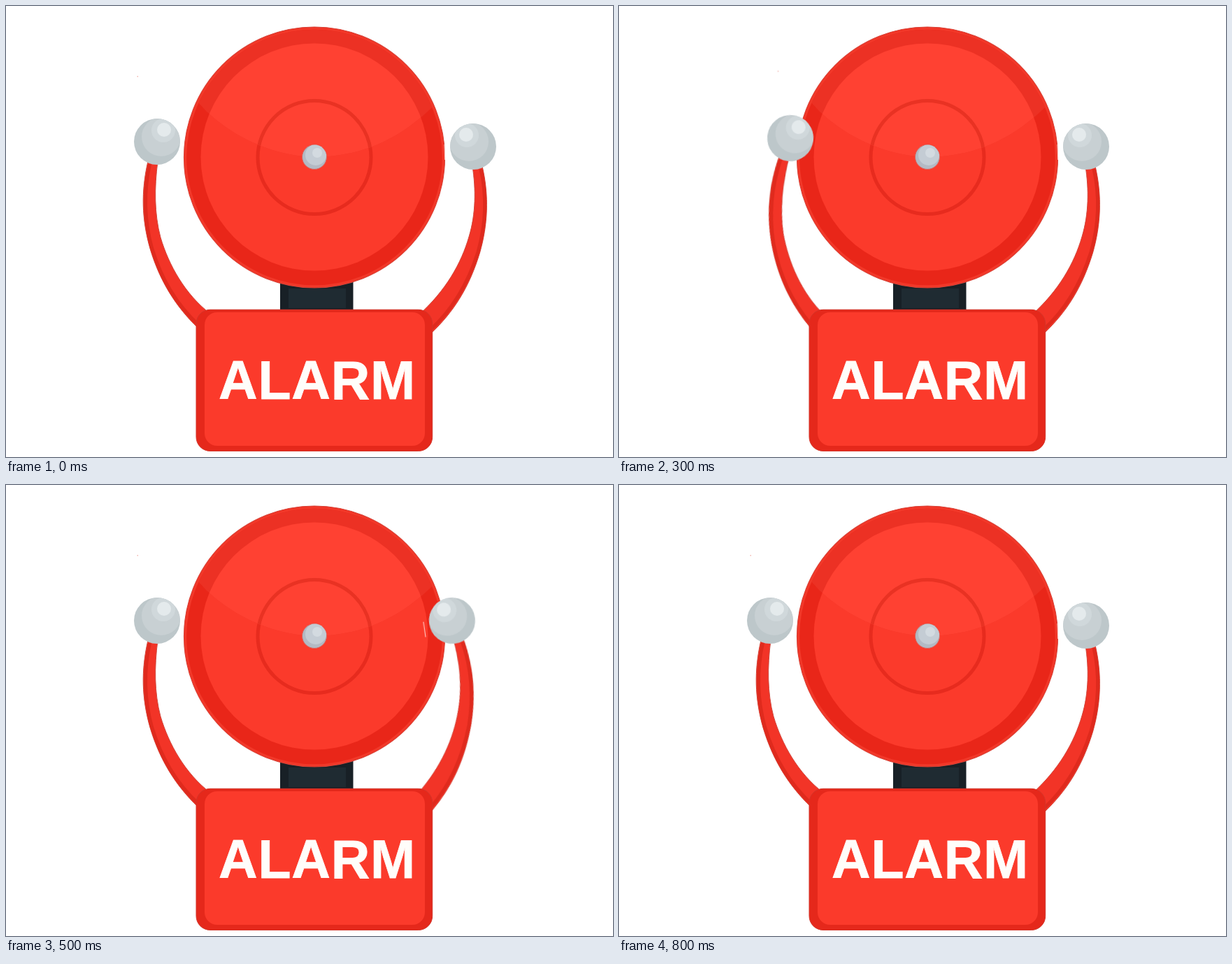
These frames come from a looping animation (868 by 645 pixels, 0.9 s). An HTML page:

```html
<!DOCTYPE html>
<html lang="en">
<head>
<meta charset="utf-8">
<title>Alarm bell</title>
<style>
  html, body { margin: 0; width: 100%; height: 100%; overflow: hidden; background: #fff; }
  svg { display: block; width: 100%; height: 100%; }

  .left, .right { animation: 900ms step-end infinite; }
  .left { transform-origin: 276px 455px; animation-name: strike-left; }
  .right { transform-origin: 592px 460px; animation-name: strike-right; }

  /* The left hammer strikes twice, then the right one does. */
  @keyframes strike-left {
    0%, 22.2%, 44.4%, 100% { transform: none; }
    11.1%, 33.3% { transform: rotate(6.3deg); }
  }
  @keyframes strike-right {
    0%, 66.6%, 88.8%, 100% { transform: none; }
    55.5%, 77.7% { transform: rotate(-6.55deg); }
  }

  .label {
    font: bold 77px "Liberation Sans", Arial, sans-serif; letter-spacing: 0.8px;
    fill: #fffdfa; stroke: #fffdfa; stroke-width: 0.8;
  }
  .arm { fill: #f23427; stroke: #d0453a; stroke-width: 1; }
  .shade { fill: none; stroke: #df2a1d; stroke-width: 5; }
  .ring { fill: none; stroke-width: 5; }
</style>
</head>
<body>
<svg viewBox="0 0 868 645">
  <defs>
    <clipPath id="gloss">
      <path d="M240 20H650V112L607 147C570 182 520 215 441 216C370 214 315 178 286 150L240 100Z"/>
    </clipPath>
    <clipPath id="ballEdge"><circle r="33"/></clipPath>
    <clipPath id="knobEdge"><circle cx="441" cy="216" r="17.5"/></clipPath>
    <g id="ball">
      <circle r="33" fill="#bdc7ca"/>
      <g clip-path="url(#ballEdge)">
        <circle cx="6" cy="-7" r="28" fill="#c8d0d3"/>
        <circle cx="9" cy="-16" r="17" fill="#d0d8db"/>
        <circle cx="10" cy="-17" r="10" fill="#e4eaec"/>
      </g>
    </g>
  </defs>

  <rect x="392" y="390" width="104.5" height="46" fill="#182026"/>
  <rect x="404" y="404" width="82" height="28" fill="#1f2b32"/>

  <!-- Bell -->
  <circle cx="441" cy="216.5" r="186.5" fill="#e92619" stroke="#d8453a" stroke-width="1.2"/>
  <circle cx="441" cy="216.5" r="184.3" fill="none" stroke="#f23829" stroke-width="3"/>
  <circle cx="441" cy="216" r="162.5" fill="#fb3a2b"/>
  <circle class="ring" cx="441" cy="216.5" r="81" stroke="#e72b1e"/>
  <g clip-path="url(#gloss)">
    <circle cx="441" cy="216.5" r="182.8" fill="#ec3124"/>
    <circle cx="441" cy="216" r="162.5" fill="#ff4132"/>
    <circle class="ring" cx="441" cy="216.5" r="81" stroke="#e93223"/>
  </g>
  <circle cx="441" cy="216" r="17.5" fill="#b3bac4" stroke="#d8655f" stroke-width="1"/>
  <g clip-path="url(#knobEdge)">
    <circle cx="443" cy="213" r="15" fill="#c4ccd4"/>
    <circle cx="445" cy="210" r="7" fill="#d3dae0"/>
  </g>

  <!-- Hammers -->
  <g class="left">
    <path class="arm" d="M203 222C193 265 194 305 206 347C220 394 243 430 274 460L292 440C256 412 233 371 221 331C212 297 212 260 217 222Z"/>
    <path class="shade" d="M205.5 226C196.5 267 197.5 306 208.5 346C222.5 393 246 429 275 456"/>
    <use href="#ball" x="216" y="194"/>
    <rect x="187.5" y="100" width="1.5" height="1.5" fill="#f4b6b0"/>
  </g>
  <g class="right">
    <path class="arm" d="M681 229C691 272 689 313 677.5 353C663 401 641 437 607 469L590 442C629 407 651 368 662 330C672 297 672 262 667 229Z"/>
    <path class="shade" d="M679 233C688 273 686 313 675 352C660 399 638 435 606 464"/>
    <use href="#ball" transform="translate(668 201) scale(-1 1)"/>
    <path d="M627 198L627.7 220" stroke="#ffd5d0" stroke-width="1"/>
  </g>

  <!-- Box -->
  <rect x="272" y="434.3" width="337.7" height="202.2" rx="20" fill="#e5281b" stroke="#d2352a" stroke-width="1"/>
  <rect x="284" y="438" width="315" height="191" rx="18" fill="#fb3a2b"/>
  <text class="label" x="304" y="562.3">ALARM</text>
</svg>
</body>
</html>
```
